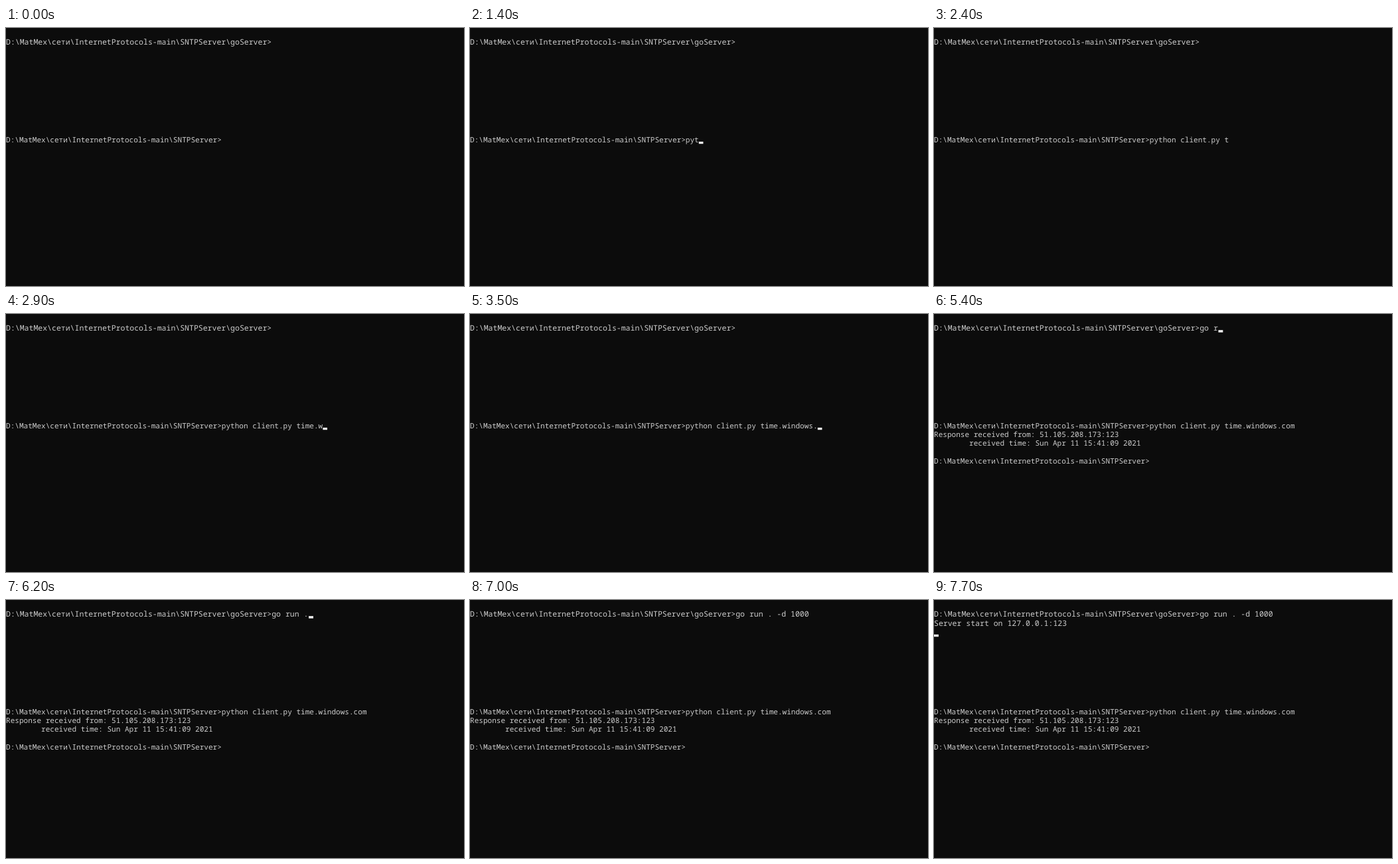
Recreate the animation shown at these times as an HTML page. Size 690 by 388 pixels, loop 8000 ms.

```html
<!DOCTYPE html>
<html lang="en">
<head>
<meta charset="utf-8">
<title>Terminal session</title>
<style>
  html, body { margin: 0; width: 100%; height: 100%; overflow: hidden; background: #0c0c0c; }
  svg { display: block; width: 100%; height: 100%; }
  text {
    font-family: "Noto Sans Mono", "DejaVu Sans Mono", monospace;
    fill: #ccc;
    white-space: pre;
    text-rendering: geometricPrecision;
  }
  .cursor { fill: #f2f2f2; }
</style>
</head>
<body>
<svg id="stage" viewBox="0 0 690 388"></svg>
<script>
const LOOP = 8000;
const BLINK = 200;
const SKIP = 100;
const stage = document.getElementById('stage');
const root = String.raw`D:\MatMex\сети\InternetProtocols-main\SNTPServer`;

// pace: [time, characters typed], with even typing in between
const panes = [
  {
    top: 13.8, cell: 6.91, skip: 0,
    prompt: root + '\\goServer>',
    command: 'go run . -d 1000',
    pace: [[5000, 0], [5800, 8], [6200, 8], [7000, 16]],
    focus: 5000, enter: 7300, reply: 7700, blur: LOOP,
    output: ['Server start on 127.0.0.1:123', '']
  },
  {
    top: 160.95, cell: 6.63, skip: 2,
    prompt: root + '>',
    command: 'python client.py time.windows.com',
    pace: [[1100, 0], [1800, 7], [1900, 16], [2200, 17], [2300, 17], [3200, 26], [3500, 30], [3900, 33]],
    focus: 700, enter: 4200, reply: 4300, blur: 4500,
    output: ['Response received from: 51.105.208.173:123',
             '        received time: Sun Apr 11 15:41:09 2021', '', root + '>']
  }
];

function add(name, attrs) {
  const el = document.createElementNS('http://www.w3.org/2000/svg', name);
  for (const key in attrs) el.setAttribute(key, attrs[key]);
  return stage.appendChild(el);
}

function keyTimes(pace) {
  const times = [];
  for (let i = 1; i < pace.length; i++) {
    const [t0, n0] = pace[i - 1];
    const [t1, n1] = pace[i];
    for (let n = n0 + 1; n <= n1; n++) {
      times.push(Math.round(t0 + (t1 - t0) * (n - n0) / (n1 - n0)));
    }
  }
  return times;
}

function build(pane) {
  const { top, cell, output } = pane;
  pane.line = cell * 2;
  pane.keys = keyTimes(pane.pace);
  pane.marks = [pane.focus, ...pane.keys, pane.enter, pane.reply];
  pane.rows = ['', ...output].map((_, i) => add('text', {
    x: 0, y: top + pane.line * (i + 0.82), 'font-size': cell / 0.6
  }));
  pane.cursor = add('rect', { class: 'cursor', width: cell, height: pane.line / 4 });
}

// Input restarts the blink; every eighth key hides the cursor for a moment.
function cursorOn(pane, t, typed) {
  if (t < pane.focus || t >= pane.blur) return false;
  if (typed % 8 === pane.skip && t - pane.keys[typed - 1] < SKIP) return false;
  const since = t - pane.marks.filter(m => m <= t).pop();
  return Math.floor(since / BLINK) % 2 === 0;
}

function draw(pane, t) {
  const typed = pane.keys.filter(k => k <= t).length;
  const lines = [pane.prompt + pane.command.slice(0, typed)];
  if (t >= pane.reply) lines.push(...pane.output);
  else if (t >= pane.enter) lines.push('');

  pane.rows.forEach((row, i) => {
    const text = lines[i] || '';
    if (row.textContent !== text) row.textContent = text;
  });

  const last = lines.length - 1;
  pane.cursor.setAttribute('x', lines[last].length * pane.cell);
  pane.cursor.setAttribute('y', pane.top + pane.line * (last + 0.75));
  pane.cursor.setAttribute('visibility', cursorOn(pane, t, typed) ? 'visible' : 'hidden');
}

function render(t) {
  panes.forEach(pane => draw(pane, t));
}

panes.forEach(build);
render(0);
const began = performance.now();
function tick() {
  render((performance.now() - began) % LOOP);
  requestAnimationFrame(tick);
}
requestAnimationFrame(tick);
</script>
</body>
</html>
```
